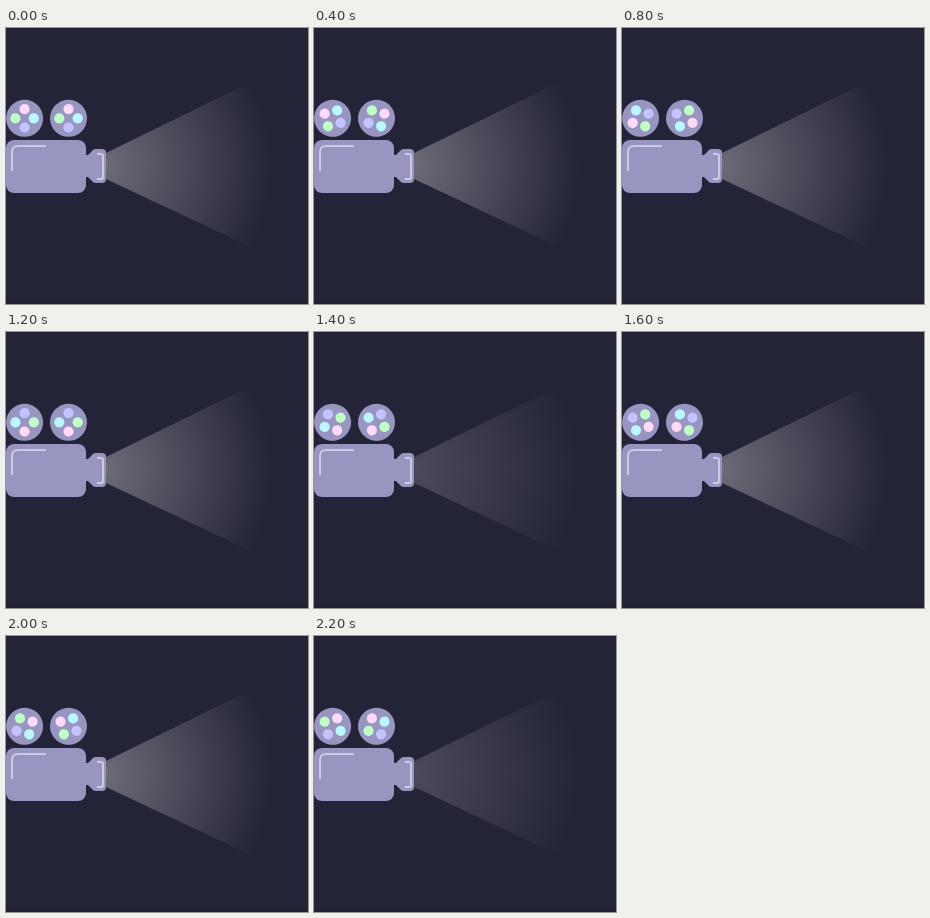
Animation, 302 px wide and 276 px high, one loop 2.4 s. Source, as an HTML page:

```html
<!DOCTYPE html>
<html lang="en">
<head>
<meta charset="utf-8">
<title>Film projector</title>
<style>
  html, body { margin: 0; width: 100%; height: 100%; overflow: hidden; background: #242439; }
  svg { display: block; }
  .shell { fill: #9896c0; }
  .shine { fill: none; stroke: #cbcae2; stroke-width: 2; }
</style>
</head>
<body>
<svg width="302" height="276" viewBox="0 0 302 276">
  <defs>
    <radialGradient id="glow" gradientUnits="userSpaceOnUse" cx="100" cy="138" r="166">
      <stop offset="0" stop-color="#fffaf0" stop-opacity=".33"/>
      <stop offset="1" stop-color="#fffaf0" stop-opacity="0"/>
    </radialGradient>
    <g id="reel">
      <circle class="shell" r="18.5"/>
      <circle cy="-9.2" r="5.1" fill="#ffd9f8"/>
      <circle cx="-9.2" r="5.1" fill="#bfffc6"/>
      <circle cx="9.2" r="5.1" fill="#bbf7ff"/>
      <circle cy="9.2" r="5.1" fill="#c3c4ff"/>
    </g>
  </defs>
  <rect width="302" height="276" fill="#242439"/>
  <rect y="271" width="302" height="5" fill="#222236"/>
  <path id="beam" d="M100 125L302 26V246L100 151Z" fill="url(#glow)"/>
  <use id="left" href="#reel"/>
  <use id="right" href="#reel"/>
  <rect class="shell" y="112" width="80" height="53" rx="8"/>
  <path class="shell" d="M79 127H82L87 122Q88 121 90 121H96Q100 121 100 125V151Q100 155 96 155H90Q88 155 87 154L82 149H79Z"/>
  <path class="shine" d="M6 143V124Q6 118 12 118H40"/>
  <path class="shine" d="M91 126H95Q97 126 97 128V149Q97 151 95 151H91"/>
</svg>
<script>
  const [beam, left, right] = ['beam', 'left', 'right'].map(id => document.getElementById(id));
  const STEP = 200, STEPS = 12;

  const place = (reel, x, angle) =>
    reel.setAttribute('transform', `translate(${x} 90.3) rotate(${angle})`);

  function draw() {
    const step = Math.floor(performance.now() / STEP) % STEPS;
    const angle = step * 360 / STEPS;
    place(left, 18.6, -angle);
    place(right, 62.5, angle);
    // The lamp flickers on every other step
    beam.setAttribute('opacity', step % 2 ? 0.54 : 1);
    requestAnimationFrame(draw);
  }
  draw();
</script>
</body>
</html>
```
